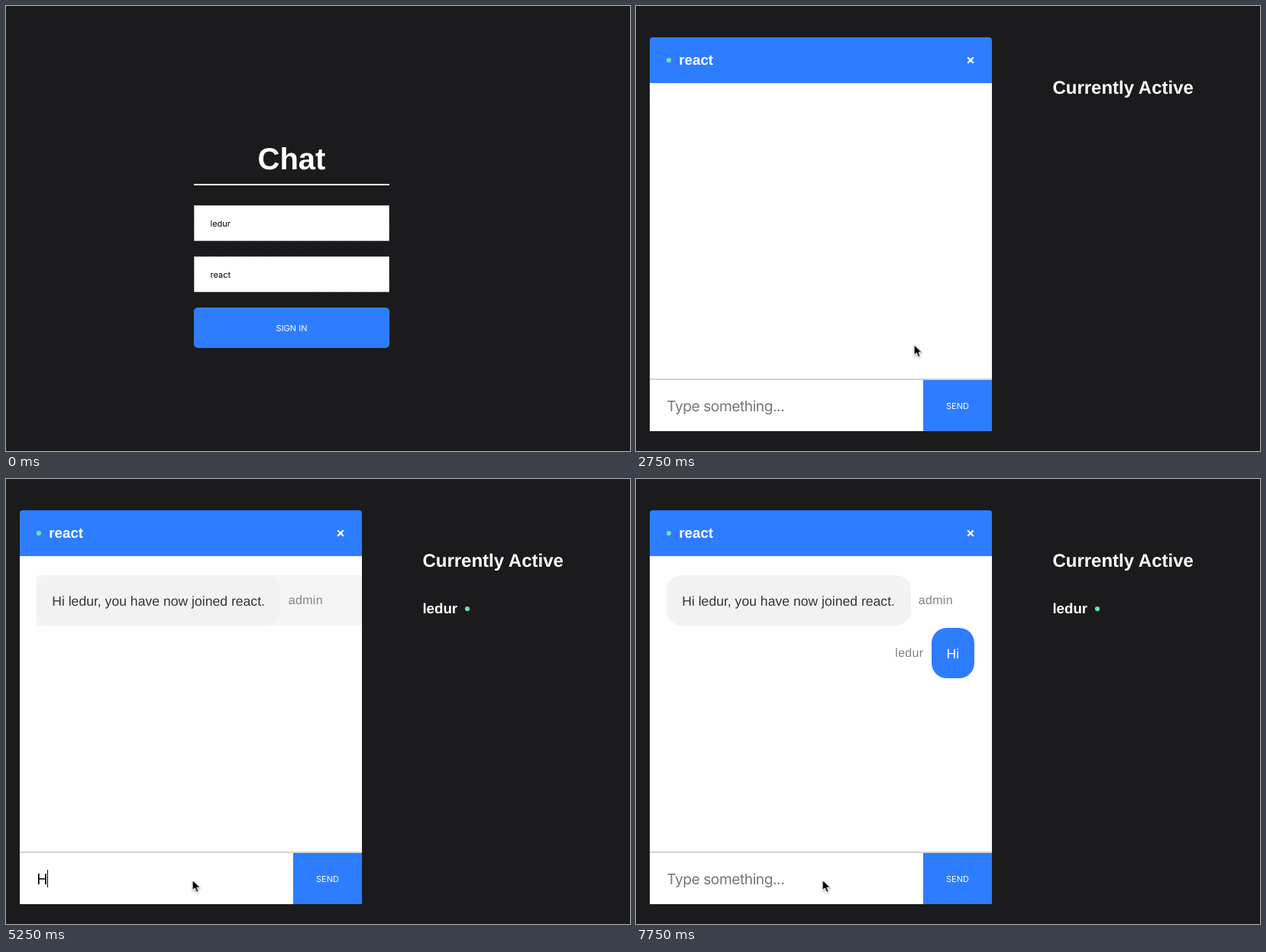
Animation of 817x583 px, one loop 8000 ms. Source, as an HTML page:

```html
<!DOCTYPE html>
<html lang="en">
<head>
<meta charset="utf-8">
<title>Chat</title>
<style>
  html, body { margin: 0; width: 100%; height: 100%; overflow: hidden; background: #1b1b1d; }
  svg { display: block; width: 817px; height: 583px; }
  text { font-family: "Liberation Sans", Arial, sans-serif; fill: #fff; text-rendering: geometricPrecision; }
  .ui { font: 11px Inter, sans-serif; }
  .dark { fill: #000; }
  .mid { text-anchor: middle; }
  .h1 { font-size: 40px; font-weight: 700; }
  .h2 { font-size: 24px; font-weight: 700; }
  .h3 { font-size: 18.72px; font-weight: 700; }
  .msg { font-size: 17.6px; }
  .by { font-size: 16px; letter-spacing: .3px; fill: #828282; }
  .entry { font: 19.2px Inter, sans-serif; letter-spacing: -.46px; fill: #000; }
  .hint { fill: #757575; }
  .blue { fill: #2e7dff; }
  .field { fill: #fff; stroke: #cfcfd4; stroke-dasharray: 2 1; }
  .dot { fill: #63e6a8; }

  /* one 8 s clock, hard steps only: 250 ms = 3.125% */
  .step { animation: 8s step-end infinite; }
  .login { animation-name: login; }
  .chat { animation-name: chat; }
  .joined { animation-name: joined; }
  .strip { animation-name: strip; }
  .sent { animation-name: sent; }
  .hint { animation-name: hint; }
  .t1 { animation-name: t1; }
  .t2 { animation-name: t2; }
  .t3 { animation-name: t3; }
  .caret { animation-name: caret; }
  .pointer { animation-name: pointer; filter: drop-shadow(0 1px .8px rgba(0, 0, 0, .35)); }

  @keyframes login { 0% { opacity: 1 } 34.375%, 100% { opacity: 0 } }
  @keyframes chat { 0% { opacity: 0 } 34.375%, 100% { opacity: 1 } }
  @keyframes joined { 0% { opacity: 0 } 37.5%, 100% { opacity: 1 } }
  @keyframes strip { 0% { opacity: 1 } 93.75%, 100% { opacity: 0 } }
  @keyframes sent { 0% { opacity: 0 } 90.625%, 100% { opacity: 1 } }
  @keyframes hint { 0% { opacity: 1 } 65.625% { opacity: 0 } 90.625%, 100% { opacity: 1 } }
  @keyframes t1 {
    0% { opacity: 0 } 65.625% { opacity: 1 } 71.875% { opacity: 0 }
    81.25% { opacity: 1 } 84.375%, 100% { opacity: 0 }
  }
  @keyframes t2 { 0% { opacity: 0 } 71.875% { opacity: 1 } 81.25%, 100% { opacity: 0 } }
  @keyframes t3 { 0% { opacity: 0 } 84.375% { opacity: 1 } 90.625%, 100% { opacity: 0 } }
  @keyframes caret {
    0% { opacity: 0; transform: translate(40px, 512px) }
    53.125% { opacity: 1; transform: translate(40px, 512px) }
    56.25% { opacity: 0; transform: translate(40px, 512px) }
    62.5% { opacity: 1; transform: translate(40px, 512px) }
    65.625% { opacity: 1; transform: translate(54px, 512px) }
    71.875% { opacity: 1; transform: translate(64px, 512px) }
    78.125% { opacity: 0; transform: translate(64px, 512px) }
    84.375% { opacity: 1; transform: translate(58px, 512px) }
    90.625% { opacity: 1; transform: translate(40px, 512px) }
    96.875%, 100% { opacity: 0; transform: translate(40px, 512px) }
  }
  @keyframes pointer {
    0% { opacity: 0; transform: translate(413px, 271.5px) }
    3.125% { opacity: 1; transform: translate(413px, 271.5px) }
    6.25% { opacity: 1; transform: translate(389px, 333.5px) }
    9.375% { opacity: 1; transform: translate(364px, 416.5px) }
    12.5% { opacity: 1; transform: translate(365.5px, 426.5px) }
    25% { opacity: 1; transform: translate(365.5px, 428.5px) }
    28.125% { opacity: 1; transform: translate(363.5px, 442.5px) }
    46.875%, 100% { opacity: 1; transform: translate(243.5px, 524px) }
  }
</style>
</head>
<body>
<svg viewBox="0 0 817 583">
  <g class="step login">
    <text class="h1 mid" x="374" y="214">Chat</text>
    <rect x="246" y="233" width="256" height="2" fill="#fff"/>
    <rect class="field" x="246.5" y="261.5" width="255" height="46"/>
    <text class="ui dark" x="267.5" y="289">ledur</text>
    <rect class="field" x="246.5" y="328.5" width="255" height="46"/>
    <text class="ui dark" x="267.5" y="356">react</text>
    <rect class="blue" x="246" y="395" width="256" height="53" rx="5"/>
    <text class="ui mid" x="374" y="426">SIGN IN</text>
  </g>

  <g class="step chat">
    <rect x="18" y="60" width="448" height="497" fill="#fff"/>
    <path class="blue" d="M18 101V45a4 4 0 0 1 4-4H462a4 4 0 0 1 4 4V101Z"/>
    <circle class="dot" cx="43" cy="71" r="3.1"/>
    <text class="h3" x="56.3" y="77">react</text>
    <path d="M434.2 67.2l7.6 7.6m0-7.6l-7.6 7.6" stroke="#fff" stroke-width="2.2"/>
    <text class="h2" x="545.4" y="115">Currently Active</text>

    <g class="step joined">
      <text class="h3" x="545.4" y="176">ledur</text>
      <circle class="dot" cx="604" cy="170" r="3.1"/>
      <rect class="step strip" x="40" y="126" width="426" height="66" fill="#f5f5f5"/>
      <rect x="40" y="126" width="320" height="66" rx="20" fill="#f2f2f2"/>
      <text class="msg" x="60.2" y="166" style="fill:#353535">Hi ledur, you have now joined react.</text>
      <text class="by" x="369.8" y="164">admin</text>
    </g>

    <g class="step sent">
      <text class="by" x="339.3" y="233">ledur</text>
      <rect class="blue" x="387" y="195" width="56" height="66" rx="20"/>
      <text class="msg" x="406.6" y="235">Hi</text>
    </g>

    <rect x="18" y="488" width="448" height="2" fill="#d3d3d3"/>
    <text class="entry step hint" x="40.2" y="531">Type something...</text>
    <text class="entry step t1" x="40.2" y="531">H</text>
    <text class="entry step t2" x="40.2" y="531">Hu</text>
    <text class="entry step t3" x="40.2" y="531">Hi</text>
    <rect class="step caret" width="1" height="23"/>
    <rect class="blue" x="376" y="490" width="90" height="67"/>
    <text class="ui mid" x="421" y="528">SEND</text>
  </g>

  <path class="step pointer" d="M.6 1.2V15.2L3.8 12.2L6.1 17.4L8.8 16.2L6.6 11.2H11Z"
        fill="#000" stroke="#fff" stroke-width="1.1" stroke-linejoin="round"/>
</svg>
</body>
</html>
```
